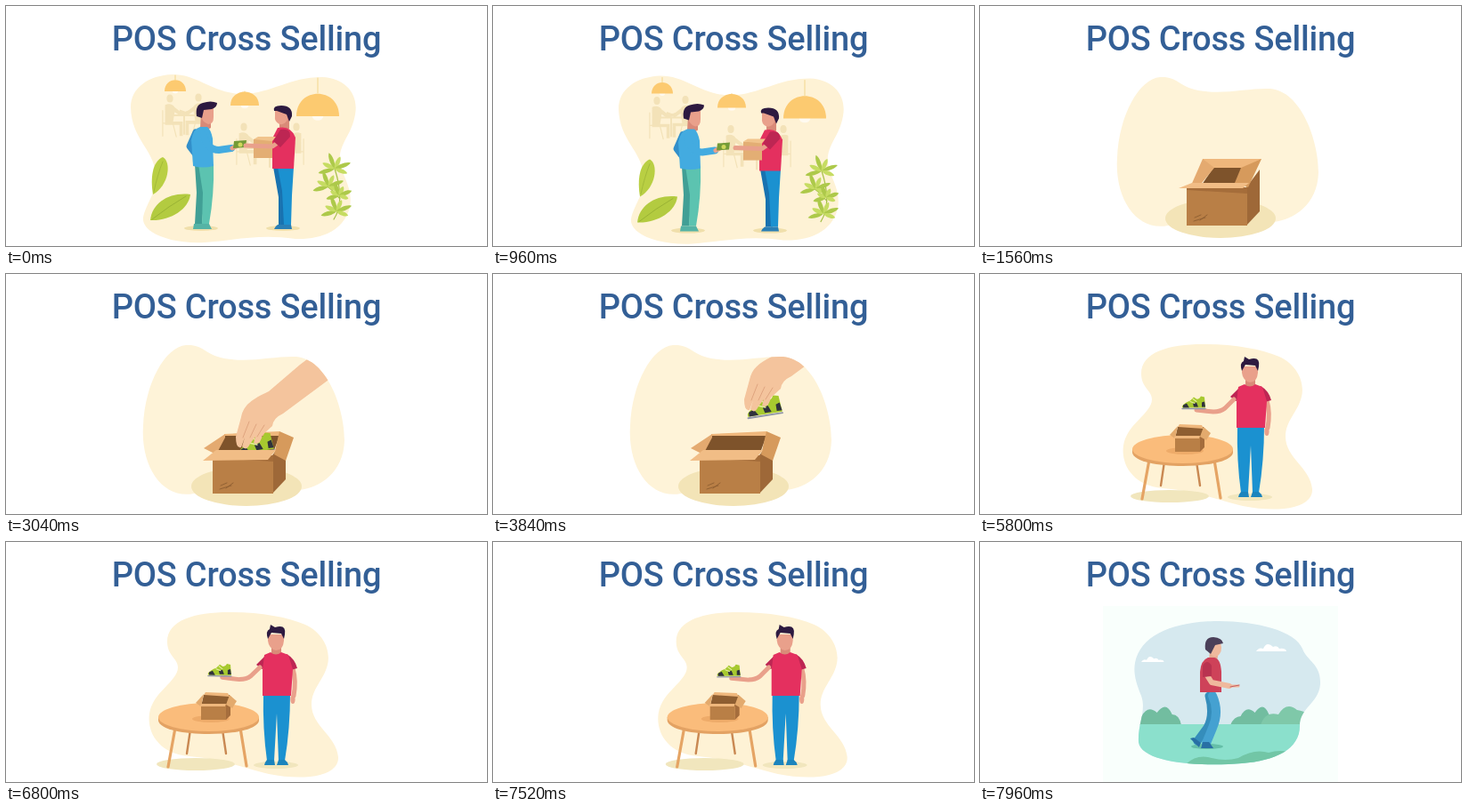
Recreate the animation shown at these times as an HTML page. Size 540x270 px, loop 8 s.

```html
<!DOCTYPE html>
<html lang="en">
<head>
<meta charset="utf-8">
<title>POS Cross Selling</title>
<style>
html, body { margin: 0; width: 100%; height: 100%; overflow: hidden; background: #fff }
svg { display: block; width: 100vw; height: 100vh }
text { font: 500 38px Roboto, "Open Sans", sans-serif; letter-spacing: -.2px; fill: #335f96 }
</style>
</head>
<body>
<svg id="stage" viewBox="0 0 540 270"></svg>
<script>
const LOOP = 8000;
const $ = id => document.getElementById(id);
const path = (d, fill, extra = '') => `<path d="${d}" fill="${fill}" ${extra}/>`;
const line = (d, color, width, extra = '') =>
  `<path d="${d}" fill="none" stroke="${color}" stroke-width="${width}" stroke-linecap="round" stroke-linejoin="round" ${extra}/>`;
const oval = (x, y, rx, ry, fill) => `<ellipse cx="${x}" cy="${y}" rx="${rx}" ry="${ry}" fill="${fill}"/>`;
const group = (id, body) => `<g id="${id}">${body}</g>`;
const clip = (id, d) => `<clipPath id="${id}"><path d="${d}"/></clipPath>`;

const CREAM = '#fef2d5', GHOST = '#f3e2b8', HAIR = '#2d1a40', RED = '#e4305f', CRIMSON = '#bd2653', BLUE = '#1b91d0';
const TAN = '#efb77c', CARD = '#b97f46', DARK = '#8e5e31', SKIN = '#f4c49d', FACE = '#e9a08b', NECK = '#d98a78';

const blobs = {
  shop: 'M140 114C140 92 160 78 187 77C216 77 231 98 265 99C300 98 317 80 355 80C382 81 396 100 392 122C388 146 373 155 375 175C377 192 390 204 386 226C380 252 355 263 325 262C285 256 260 263 223 266C185 268 152 255 154 238C157 222 170 210 168 188C165 160 141 150 140 114Z',
  pack: 'M154 171C156 122 179 82 202 80C222 79 222 90 245 95C275 100 301 92 326 93C360 96 380 150 380 187C379 224 352 240 330 243C292 247 245 240 211 247C176 254 151 217 154 171Z',
  show: 'M181 112C181 88 212 79 250 79C285 79 315 84 336 93C356 102 365 122 361 138C357 155 343 165 343 183C343 207 371 218 373 242C374 264 335 269 295 261C260 252 240 244 205 241C172 238 158 215 161 193C165 168 193 157 193 141C193 131 181 128 181 112Z',
  park: 'M174 136C180 105 216 90 263 89C306 88 354 99 362 120C367 134 383 137 382 160C380 182 359 186 359 207C359 233 332 246 294 249C249 253 181 249 178 225C177 204 187 190 181 173C175 158 172 148 174 136Z'
};

const lamp = (x, y, w, h, top) =>
  line(`M${x} ${top}V${y - h}`, '#f3d68c', 1) +
  oval(x, y, w * .26, w * .2, '#fffaf0') +
  path(`M${x - w} ${y}C${x - w} ${y - h * 1.3} ${x + w} ${y - h * 1.3} ${x + w} ${y}Z`, '#fcca70');

const sitter = (x, y, s, flip) =>
  `<g transform="translate(${x} ${y}) scale(${s * flip} ${s})">` + oval(0, 0, 4, 5, GHOST) +
  path('M-6 8Q2 5 6 11L15 18 23 15 24 18 13 22 6 17 4 29H16V47H12V33H-6Z', GHOST) +
  line('M-9 15V47M-8 31H4M4 32L8 48', GHOST, 1.3) + '</g>';

const leaf = (x, y, angle, w, h, fill) =>
  path(`M0 0C${-w} ${-h * .25} ${-w} ${-h * .8} 0 ${-h}C${w} ${-h * .8} ${w} ${-h * .25} 0 0Z`, fill,
    `transform="translate(${x} ${y}) rotate(${angle})"`);

function plant() {
  const fan = (x, y, size) => [-105, -65, -20, 25, 70, 110].map((a, i) =>
    leaf(x, y, a, 3.2, size - (i % 2) * 4, i % 2 ? '#c6dc62' : '#adc94a')).join('');
  return line('M368 240Q381 220 369 183M375 217Q366 206 359 202', '#a5bf47', 1.2) +
    fan(369, 183, 19) + fan(362, 203, 18) + fan(374, 213, 15) + fan(371, 231, 18);
}

// Toe to the left, heel to the right.
const trainer = `<g>
  ${path('M0 12Q3 8 9 6L13 2 16 4Q19 5 21 1L25 2 26 14H0Z', '#a7c92f')}
  ${path('M1 11L5 9 8 14H1ZM12 9L16 8 18 13H13ZM22 8L25 7 26 13H22Z', '#30323c')}
  ${line('M9 7L14 9M12 4L16 7', '#e5ef9e', 1)}
  ${line('M0 15H26', '#9096a8', 1.3)}</g>`;

const shop = path(blobs.shop, CREAM, 'id="shopBlob"') +
  lamp(190, 96, 12, 13, 78) + lamp(268, 112, 16, 16, 97) + lamp(350, 124, 24, 26, 81) +
  sitter(184, 104, .9, 1) + sitter(216, 103, .9, -1) +
  line('M188 123H212M200 124V144', GHOST, 2) +
  sitter(267, 136, .9, 1) + sitter(326, 136, .9, -1) +
  line('M265 160H329M296 160V181', GHOST, 2) +
  path('M165 212C162 194 164 175 176 170C186 175 183 202 165 212Z', '#b9cf43') + line('M166 209Q170 190 176 175', '#9db536', .8) +
  path('M162 241C164 221 184 209 207 212C205 229 184 242 162 241Z', '#b3cb40') + line('M164 240Q183 225 202 214', '#94ad32', .8) + plant() +
  oval(219, 250, 19, 3, '#f0dfab') + oval(311, 250, 19, 3, '#f0dfab') +
  group('seller',
    line('M213 142L206 158 215 170', '#328fca', 7) +
    path('M212 178H226L223 210 220 245H212L214 210Z', '#419f95') +
    path('M216 178H233Q234 211 228 245H220L221 210Z', '#5cc3b0') +
    path('M211 245H220L221 251H210ZM220 245H228L231 251H219Z', '#55b3a5') +
    path('M219 121H230V137L225 140 218 137Z', NECK) + path('M219 115H233V125Q233 133 227 133Q219 130 219 122Z', FACE) +
    path('M214 124Q212 111 221 109Q230 106 237 109Q237 114 231 116L222 117 220 126Z', HAIR) +
    path('M218 136Q210 138 208 151L210 180Q221 183 233 180L232 149Q230 139 226 136Z', '#43abe0') +
    group('giver', line('M222 145C224 156 230 162 239 162L253 160', '#43abe0', 8) +
      line('M254 160L260 157', FACE, 5) +
      path('M256 152L270 151 269 159 255 160Z', '#749b37') + oval(263, 156, 2.5, 2.5, '#d0d85c'))) +
  group('buyer',
    path('M300 181H313Q317 212 314 246H306L306 215Z', '#1872b0') +
    path('M305 181H323L321 213 320 246H312L310 208Z', BLUE) +
    path('M305 246H313V251H301Q302 248 305 246ZM312 246H320L321 251H308Q309 248 312 246Z', '#2a7fb5') +
    path('M307 124H318V138L312 142 307 137Z', NECK) + path('M302 116H316V128Q313 134 307 133Q301 130 302 124Z', FACE) +
    path('M301 118Q299 112 309 112Q322 112 321 124L318 130 315 122 304 118Z', HAIR) +
    path('M305 137Q320 134 325 148L323 183H299V149Z', RED) +
    group('taker', path('M278 150H299V171H278Z', '#e3ae74') + path('M278 150L283 147H303L299 152Z', '#f1c48c') +
      line('M309 151L299 158 269 157', FACE, 5) + path('M308 139Q320 137 319 147L308 159 300 152Z', CRIMSON)));

// Each panel: colour, then its corners closed, half open and fully open.
const panels = [
  ['#7e532b', [[236, 204, 250, 182, 314, 182, 301, 204], [249, 201, 262, 182, 294, 182, 286, 201], [236, 201, 246, 182, 307, 182, 300, 201]]],
  [TAN, [[250, 182, 314, 182, 309, 191, 244, 191], [250, 172, 316, 172, 306, 182, 250, 182], [245, 180, 307, 177, 307, 182, 245, 182]]],
  ['#e4aa70', [[236, 204, 250, 182, 276, 182, 265, 204], [236, 204, 250, 172, 263, 182, 249, 199], [222, 196, 246, 180, 246, 184, 236, 203]]],
  ['#d69a5c', [[301, 204, 314, 182, 276, 182, 265, 204], [301, 204, 316, 172, 293, 182, 286, 199], [301, 203, 307, 177, 323, 184, 314, 210]]],
  ['#f1bd86', [[233, 205, 300, 205, 309, 191, 244, 191], [223, 205, 295, 205, 302, 199, 238, 199], [221, 210, 294, 209, 303, 198, 236, 198]]]
];
const panel = i => path('', panels[i][0], `id="flap${i}"`);

const pack = path(blobs.pack, '#fef3d8') + oval(270, 239, 62, 22, '#f3e4b7') +
  panel(0) + panel(1) +
  `<g clip-path="url(#packClip)">` + group('arm',
    `<g transform="translate(259 182) rotate(-9) scale(1.5)">${trainer}</g>` +
    path('M398 51L330 102 295 132C276 141 267 147 264 161L258 183Q258 197 264 195L268 184 265 194Q270 200 274 191L280 183 278 190Q285 194 288 181L299 171Q300 162 311 157L389 99Z', SKIN) +
    line('M273 166L266 184M281 169L274 184M290 170L282 183', '#dfa47f', 1)) + '</g>' +
  path('M299 204L314 184V231L299 247Z', '#9e6838') + path('M232 204H300V247H232Z', CARD) +
  path('M232 204H300V211L232 207Z', '#a56d3a') +
  line('M241 238L248 235M240 242L253 238M247 241L255 235', DARK, .9) +
  panel(2) + panel(3) + panel(4);

const crate = path('M222 172L251 172 251 185 219 185Z', DARK) +
  path('M222 172L224 169 249 170 251 174Z', TAN) +
  path('M222 171L213 181 219 185Z', '#e3aa6d') +
  path('M219 183H247V200H219Z', CARD) + path('M247 183L252 177V195L247 200Z', '#a56d3c') +
  path('M219 182H247L246 185H217Z', TAN) + path('M247 183L251 172 259 179 254 187Z', '#e3aa6d');

const show = path(blobs.show, CREAM) +
  oval(213, 250, 44, 7, '#f1e6bd') + oval(303, 251, 25, 4, '#f1e6bd') +
  line('M207 211L203 238M243 211L247 238', '#c98852', 2.4) +
  line('M190 209L182 253M263 209L270 252', '#e5a464', 3.2) +
  path('M171 197V201C174 221 281 221 284 201V197Z', '#e3a263') + oval(227.5, 197, 56.5, 16, '#fabc7b') +
  oval(230, 199, 21, 4, '#eeab69') + crate +
  group('man',
    line('M322 142Q326 156 323 173', FACE, 5) + oval(322, 177, 2.6, 5, FACE) +
    path('M289 171H319Q319 210 313 246H306L304 193 301 246H293Q288 210 289 171Z', BLUE) +
    path('M293 245H301L302 251H290Q291 247 293 245ZM306 245H313Q316 247 317 251H304Z', '#1c84bd') +
    path('M298 114H309V125L303 130 298 125Z', NECK) + path('M294 104H312V111Q311 122 303 122Q295 120 294 111Z', FACE) +
    path('M294 109Q291 100 296 98L297 93 302 96Q315 92 313 104L312 109 309 103 298 102Z', HAIR) +
    path('M293 126L281 138 287 143 297 139ZM315 126Q324 131 327 142L320 144 313 138Z', CRIMSON) +
    path('M297 124Q303 129 309 124L317 127 322 143 320 173H288V144L290 127Z', RED) +
    group('forearm', line('M285 141L275 151Q270 155 262 155L243 153', FACE, 5) +
      `<g transform="translate(227 136.5)">${trainer}</g>`));

const bush = (x, y, w, fill) =>
  path(`M${x} ${y}q${w * .08} -10 ${w * .22} -10q${w * .12} -13 ${w * .3} -4q${w * .18} -14 ${w * .3} 2q${w * .14} 0 ${w * .18} 12z`, fill);
const cloud = (x, y, s) =>
  path('M0 8Q3 3 8 5Q12 -4 19 3Q24 1 26 5Q33 4 34 8Z', '#fff', `transform="translate(${x} ${y}) scale(${s})"`);

const park = '<rect x="138" y="72" width="264" height="198" fill="#f9fffc"/>' +
  `<g clip-path="url(#parkClip)"><rect x="138" y="72" width="264" height="198" fill="#d6e9ef"/>` +
  cloud(310, 115, 1) + cloud(181, 129, .75) + bush(169, 206, 57, '#72bda0') + bush(281, 206, 53, '#72bda0') +
  path('M315 206Q320 190 335 194Q344 179 356 189Q371 191 377 206Z', '#7fc8a9') +
  '<rect x="138" y="205" width="264" height="60" fill="#8be0cc"/>' +
  path('M231 250Q244 238 260 243Q276 247 290 243Q308 232 324 237Q342 231 366 242V260H231Z', '#72c6a6') + '</g>' +
  oval(255, 230, 18, 3, '#65bfa8') +
  group('walker',
    group('backLeg', line('M257 173Q263 195 255 209L244 224', '#358dbb', 9) + path('M240 220L248 226 246 231 236 221Z', '#286fa4')) +
    group('frontLeg', line('M261 173Q269 191 261 209L254 226', '#45a1d1', 10) + path('M250 225H257L262 232H248Z', '#286fa4')) +
    path('M258 121H268L266 135H257Z', '#e6ad93') + oval(264, 119, 7, 10, '#efb99d') +
    path('M253 121Q251 107 262 107Q272 108 273 114L264 116 259 126Z', '#4b4059') +
    path('M256 130Q248 133 247 146V169H271V146Q270 131 263 130Z', '#ce4259') +
    line('M255 150L260 158 280 162', '#efb99d', 6) + line('M279 162L290 162', '#efb99d', 3) +
    path('M250 139Q255 131 260 139V151L250 152Z', '#b93350') + line('M281 163L291 161', '#c75e62', 1));

$('stage').innerHTML = `<defs>${clip('packClip', blobs.pack)}${clip('parkClip', blobs.park)}
  ${clip('view', 'M138 72H402V270H138Z')}</defs>
  <rect width="540" height="270" fill="#fff"/>
  <text x="270" y="50" text-anchor="middle">POS Cross Selling</text>
  <g clip-path="url(#view)">${group('shop', shop)}${group('pack', pack)}${group('show', show)}${group('park', park)}</g>`;

const scenes = ['shop', 'pack', 'show', 'park'];
// Each push moves one scene out and the next one in behind it.
const PUSH = 440;
const pushes = [{ at: 900, x: 0, y: 240 }, { at: 3925, x: 0, y: 240 }, { at: 7403, x: 320, y: 0 }];
const clamp = v => Math.max(0, Math.min(1, v));
const mix = (a, b, k) => a + (b - a) * k;
const ease = (t, a, b) => { const k = clamp((t - a) / (b - a)); return k * k * (3 - 2 * k) };
const cubic = k => k < .5 ? 4 * k ** 3 : 1 - 4 * (1 - k) ** 3;
const move = (id, x, y = 0) => $(id).setAttribute('transform', `translate(${x} ${y})`);
const turn = (id, angle, x, y) => $(id).setAttribute('transform', `rotate(${angle} ${x} ${y})`);

function placeScenes(t) {
  const done = pushes.map(p => cubic(clamp((t - p.at) / PUSH)));
  scenes.forEach((id, i) => {
    const into = i ? done[i - 1] : 1, out = done[i] || 0;
    const from = pushes[i - 1] || { x: 0, y: 0 }, to = pushes[i] || { x: 0, y: 0 };
    $(id).setAttribute('display', into > 0 && out < 1 ? 'inline' : 'none');
    move(id, (into - 1) * from.x + out * to.x, (into - 1) * from.y + out * to.y);
  });
}

function openBox(t) {
  const first = ease(t, 1240, 1560), second = ease(t, 1600, 2000);
  panels.forEach(([, poses], i) => {
    const p = poses[0].map((v, j) => mix(mix(v, poses[1][j], first), poses[2][j], second));
    $('flap' + i).setAttribute('d', `M${p.slice(0, 2)}L${p.slice(2)}Z`);
  });
}

function draw(t) {
  placeScenes(t);

  const hand = ease(t, 0, 900);
  move('shopBlob', hand, -hand);
  move('giver', -4 * hand);
  move('taker', 3 * hand);

  openBox(t);
  const away = 1 - ease(t, 1880, 2640), lift = ease(t, 3080, 3700);
  move('arm', 125 * away + 24 * lift, -108 * away - 42 * lift);

  turn('forearm', Math.sin((t - 5800) / 500), 286, 140);

  const step = Math.sin((7960 - t) / 160) * 14;
  move('walker', (t - 7960) * .02);
  turn('frontLeg', step, 260, 172);
  turn('backLeg', -step, 258, 172);
}

function tick() {
  draw(performance.now() % LOOP);
  requestAnimationFrame(tick);
}
tick();
</script>
</body>
</html>
```
